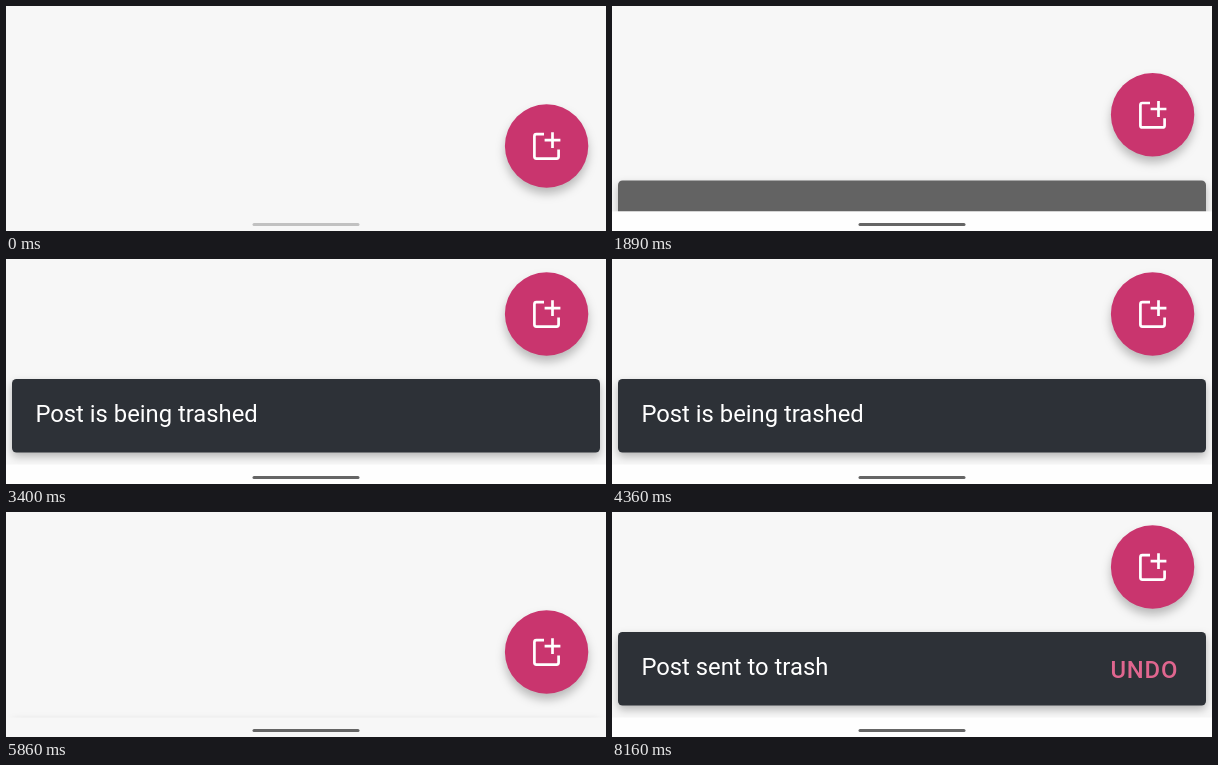
Animation, 600 px wide and 225 px high, one loop 8.22 s. Source, as an HTML page:

```html
<!DOCTYPE html>
<html lang="en">
<head>
<meta charset="utf-8">
<title>Snackbar and floating button</title>
<style>
  html, body { margin: 0; width: 100%; height: 100%; overflow: hidden; background: #f7f7f7; }
  svg { display: block; width: 600px; height: 225px; }
  text { font: 23.8px Roboto, sans-serif; fill: #fff; }
  #undo { font-weight: 500; letter-spacing: .8px; fill: #e0668f; }
  #panel { filter: drop-shadow(0 4px 4px rgba(0, 0, 0, .27)); }
  #disc { filter: drop-shadow(0 6px 5px rgba(0, 0, 0, .25)); }
</style>
</head>
<body>
<svg viewBox="0 0 600 225">
  <clipPath id="above"><rect width="600" height="205.5"/></clipPath>
  <rect width="600" height="225" fill="#f7f7f7"/>
  <g clip-path="url(#above)">
    <g id="bar">
      <rect id="panel" x="6" y="120" width="588" height="73.5" rx="4.5"/>
      <g id="content">
        <text id="message" x="29.4" y="163"></text>
        <text id="undo" x="498.5" y="166">UNDO</text>
      </g>
    </g>
  </g>
  <rect id="nav" y="205.5" width="600" height="19.5" fill="#fefefe"/>
  <rect id="handle" x="246.5" y="217" width="107" height="3" rx="1.5"/>
  <g id="fab">
    <circle id="disc" cx="540.6" cy="140" r="41.7" fill="#c9356e"/>
    <path d="M538 128.2H530.4Q528.4 128.2 528.4 130.2V150.6Q528.4 152.6 530.4 152.6H550.6Q552.6 152.6 552.6 150.6V143.5M538.6 134.2H554.4M546.5 126.3V142.1"
          fill="none" stroke="#fff" stroke-width="2.7"/>
  </g>
</svg>
<script>
  const LOOP = 8220, STEP = 60, SLIDE = 250, TRAVEL = 86;
  const FIRST_IN = 1890, FIRST_OUT = 5620, SECOND_IN = 5860;
  const el = id => document.getElementById(id);
  const clamp = v => Math.min(1, Math.max(0, v));
  const gray = v => `rgb(${v},${v},${v})`;
  const mix = (a, b, k) => a + (b - a) * k;

  // Cubic bezier (.4, 0, .2, 1), solved for x by bisection.
  function ease(x) {
    if (x <= 0 || x >= 1) return clamp(x);
    let low = 0, high = 1;
    for (let i = 0; i < 24; i++) {
      const s = (low + high) / 2, r = 1 - s;
      if (1.2 * r * r * s + .6 * r * s * s + s ** 3 < x) low = s; else high = s;
    }
    return 3 * (1 - low) * low * low + low ** 3;
  }

  // The screen refreshes in steps; lead is the progress at the first visible step.
  const elapsed = (t, start, lead) => Math.floor((t - start) / STEP) * STEP + lead;

  function barState(t) {
    if (t < FIRST_IN) return { shown: 0, alpha: 0 };
    if (t >= FIRST_OUT && t < SECOND_IN) {
      const e = elapsed(t, FIRST_OUT, 20);
      return { shown: 1 - ease(e / SLIDE), alpha: 1 - ease(e / 180) };
    }
    const e = t < FIRST_OUT ? elapsed(t, FIRST_IN, 75) : elapsed(t, SECOND_IN, 5);
    return { shown: ease(e / SLIDE), alpha: ease((e - 70) / 180) };
  }

  function render(t) {
    const { shown, alpha } = barState(t);
    const second = t >= SECOND_IN;
    const tint = second ? 1 : clamp((t - FIRST_IN) / 120);
    el('bar').style.display = shown > 0 ? '' : 'none';
    el('bar').setAttribute('transform', `translate(0 ${TRAVEL * (1 - shown)})`);
    el('panel').setAttribute('fill', `rgb(${mix(99, 45, tint)},${mix(99, 49, tint)},${mix(99, 55, tint)})`);
    el('content').setAttribute('opacity', alpha);
    el('message').textContent = second ? 'Post sent to trash' : 'Post is being trashed';
    el('undo').style.display = second ? '' : 'none';
    el('nav').style.display = shown > .02 ? '' : 'none';
    el('handle').setAttribute('fill', gray(mix(193, 101, clamp(t / 900))));
    el('fab').setAttribute('transform', `translate(0 ${-85 * shown})`);
  }

  const begin = performance.now();
  function frame() {
    render((performance.now() - begin) % LOOP);
    requestAnimationFrame(frame);
  }
  render(0);
  requestAnimationFrame(frame);
</script>
</body>
</html>
```
